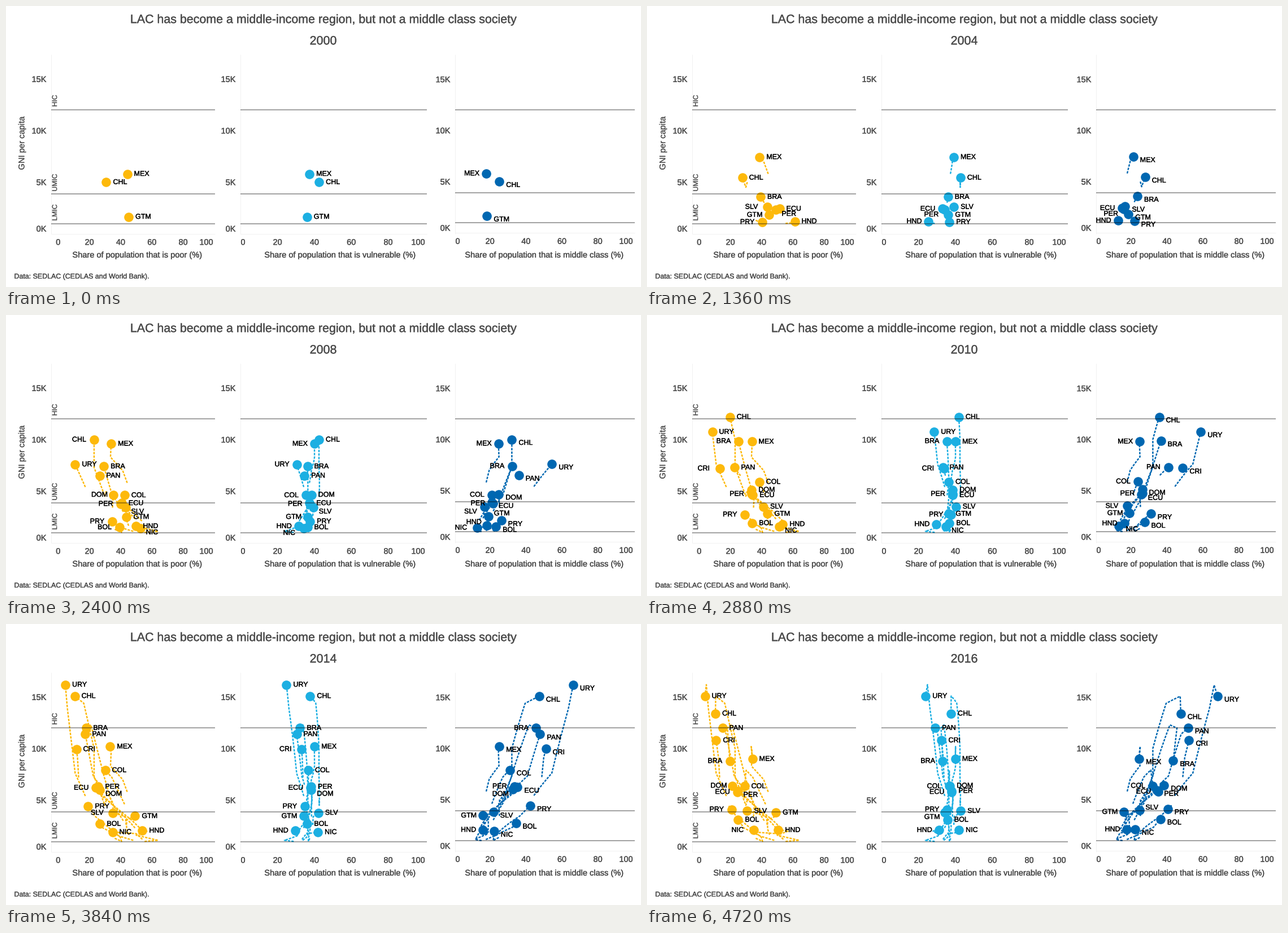
A matplotlib script for the animation above (4800 ms loop, 1124x498 px).

```python
import math

import matplotlib.pyplot as plt
import numpy as np
from matplotlib.animation import FuncAnimation
from matplotlib.patheffects import withStroke

W, H, DPI = 1124, 498, 100
FRAMES, INTERVAL = 60, 80
FIRST, LAST = 2000, 2016
PT = 72 / DPI
GREY = "#4c4c4c"
LABEL_W, LABEL_H, RADIUS = 27, 10, 8.3

plt.rcParams["font.family"] = "Liberation Sans"
plt.rcParams["text.hinting"] = "none"

fig = plt.figure(figsize=(W / DPI, H / DPI), dpi=DPI, facecolor="white")
ax = fig.add_axes([0, 0, 1, 1])
ax.set_xlim(-0.5, W - 0.5)  # whole numbers are pixel centres
ax.set_ylim(H - 0.5, -0.5)
ax.axis("off")


def write(x, y, s, size, color=GREY, ha="center", weight=0.25, **kw):
    """Text whose capitals are centred on y; sizes in pixels."""
    if "rotation" in kw:
        kw["va"] = "center"
    else:
        kw["va"] = "baseline"
        y += 0.36 * size
    effect = [withStroke(linewidth=weight, foreground=color)]
    return ax.text(x, y, s, fontsize=size * PT, color=color, ha=ha,
                   path_effects=effect, **kw)


def rule(xs, ys, color, width, **kw):
    ax.plot(xs, ys, color=color, lw=width * PT, solid_capstyle="butt", **kw)


class Panel:
    """One chart: maps a share in % and an income in thousands to pixels."""

    def __init__(self, left, right, zero, scale, caption_x, group, color,
                 label_drop=-1, shrink=1):
        self.left, self.right = left, right
        self.zero, self.scale = zero, scale
        self.caption_x, self.group, self.color = caption_x, group, color
        self.label_drop, self.shrink = label_drop, shrink

    def x(self, share):
        return self.zero + self.scale * share

    def row(self, y):
        return 183 + (y - 183) * self.shrink

    def y(self, income):
        return self.row(403 - 18.27 * income)

    def draw_frame(self):
        span = [self.left, self.right]
        rule([self.left] * 2, [85, 403], "#f1f1f1", 1, zorder=1)
        rule(span, [self.row(403)] * 2, "#f1f1f1", 1, zorder=1)
        for y in (183.5, 332, 385):
            rule(span, [self.row(y)] * 2, "black", 2, alpha=0.36, zorder=4)
        for k in (0, 5, 10, 15):
            y = min(self.y(k), self.row(394))
            write(self.left - 8, y, f"{k}K", 14.6, ha="right")
        for share in range(0, 101, 20):
            x = np.clip(self.x(share), self.left + 5, self.right - 15)
            write(x, self.row(417.5), str(share), 14.5)
        write(self.caption_x, 440,
              f"Share of population that is {self.group} (%)", 14.6)


PANELS = [
    Panel(79, 369, 91.8, 2.766, 232, "poor", "#fdb90b"),
    Panel(414, 744, 414.8, 3.265, 591, "vulnerable", "#1cafe2"),
    Panel(794, 1112, 792.5, 3.183, 952.5, "middle class", "#0067b1",
          label_drop=5, shrink=0.993),
]
for panel in PANELS:
    panel.draw_frame()

write(561, 22, "LAC has become a middle-income region, but not a middle class society", 21.4)
year_text = write(561, 60, "2000", 21.5)
write(14, 478, "Data: SEDLAC (CEDLAS and World Bank).", 12.4, ha="left")
write(28, 242.5, "GNI per capita", 14.7, weight=0.1, rotation=90)
for y, s in [(167.5, "HIC"), (312.5, "UMIC"), (365.5, "LMIC")]:
    write(86.5, y, s, 12.2, weight=0.1, rotation=90)


class Country:
    """Path through a few (year, income, poor) points.

    The middle class grows as poverty falls, scaled by `tilt`;
    the vulnerable are what is left after a small rich group.
    """

    def __init__(self, name, tilt, *points):
        years, income, poor = zip(*points)
        self.start = years[0]
        span = np.arange(self.start, LAST + 1)
        income = np.interp(span, years, income)
        poor = np.interp(span, years, poor)
        middle = tilt * 75 * np.exp(-poor / 32)
        rich = np.clip(0.13 * (middle - 14), 0.6, 4.3)
        shares = [poor, 100 - poor - middle - rich, middle]
        self.xs = [p.x(s) for p, s in zip(PANELS, shares)]
        self.ys = [p.y(income) for p in PANELS]
        self.trails, self.dots, self.labels = [], [], []
        for p in PANELS:
            self.trails += ax.plot([], [], color=p.color, lw=2.4 * PT, zorder=2,
                                   ls=(0, (1.75, 0.85)), dash_capstyle="butt")
            self.dots += ax.plot([], [], "o", color=p.color, ms=2 * RADIUS * PT,
                                 mew=0, zorder=3, snap=False)
            self.labels.append(write(0, 0, name, 12.5, "black", ha="left", zorder=5))

    def show(self, i, year):
        """Update panel i and return the mark's place, or None before the start."""
        n = year - self.start + 1
        trail, dot, label = self.trails[i], self.dots[i], self.labels[i]
        for artist in (trail, dot, label):
            artist.set_visible(n > 0)
        if n <= 0:
            return None
        xs, ys = self.xs[i][:n], self.ys[i][:n]
        trail.set_data(xs, ys)
        dot.set_data(xs[-1:], ys[-1:])
        return xs[-1], ys[-1]


COUNTRIES = []


def country(*args):
    COUNTRIES.append(Country(*args))


country("GTM", 1.0, (2000, 1.64, 45.1), (2003, 1.64, 45.1), (2006, 2.2, 43.8),
        (2012, 3.1, 43.8), (2014, 3.45, 49.2), (2016, 3.8, 49.1))
country("HND", 1.15, (2001, 1.0, 55.3), (2003, 1.1, 64), (2008, 1.6, 49.9),
        (2012, 2.0, 57.1), (2016, 2.1, 50.6))
country("PRY", 1.03, (2001, 1.3, 36.2), (2003, 1.0, 40.6), (2006, 1.4, 39.8),
        (2012, 3.4, 23.9), (2014, 4.4, 19.2), (2016, 4.1, 20.7))
country("BOL", 1.06, (2006, 1.1, 48.1), (2008, 1.5, 39.3), (2012, 2.3, 28.6),
        (2016, 3.1, 25))
country("NIC", 0.88, (2006, 1.2, 53.9), (2012, 1.75, 49.9), (2014, 1.9, 34.8),
        (2016, 2.1, 34.8))
country("SLV", 0.87, (2004, 2.6, 43.5), (2008, 3.4, 43.1), (2012, 3.6, 39.1),
        (2016, 3.95, 30.8))
country("ECU", 1.0, (2003, 2.1, 53.6), (2006, 3.05, 47.1), (2012, 5.4, 27.9),
        (2014, 6.2, 24.1), (2016, 5.8, 24.3))
country("PER", 1.0, (2004, 2.3, 49.2), (2006, 2.8, 46.3), (2012, 5.7, 27.2),
        (2014, 6.3, 25.7), (2016, 5.9, 24.7))
country("DOM", 1.0, (2006, 3.4, 34.8), (2008, 4.65, 35.3), (2012, 5.6, 31.9),
        (2016, 6.4, 21.4))
country("COL", 1.06, (2008, 4.6, 42.5), (2012, 7.2, 34.4), (2014, 7.9, 30.1),
        (2016, 6.35, 29))
country("CRI", 0.98, (2010, 7.2, 13.1), (2012, 9.1, 12.4), (2016, 10.8, 10.9))
country("PAN", 1.1, (2008, 6.5, 26.5), (2010, 7.3, 22.5), (2014, 11.4, 17.4),
        (2016, 12, 14.9))
country("BRA", 1.07, (2003, 3.0, 41.7), (2006, 4.7, 34.4), (2008, 7.4, 29.2),
        (2012, 12.3, 21), (2014, 12, 18.1), (2016, 8.8, 19.6))
country("URY", 1.02, (2006, 5.4, 17.4), (2008, 7.6, 10.9), (2012, 13.9, 5.9),
        (2014, 16.2, 4.6), (2016, 15.1, 3.7))
country("CHL", 0.88, (2000, 5.0, 30.8), (2003, 4.5, 29.9), (2006, 7.3, 23),
        (2008, 10, 23), (2012, 14.4, 16.4), (2014, 15.1, 10.6), (2016, 13.4, 10.4))
country("MEX", 0.95, (2000, 5.8, 44.2), (2003, 7.0, 41.3), (2006, 8.3, 33.5),
        (2008, 9.6, 33.9), (2014, 10.2, 33.3), (2016, 9.0, 34.1))


def overlap(x, y, w, h, boxes):
    """Total area shared by a box (centre and size) and a list of boxes."""
    if not boxes:
        return 0
    bx, by, bw, bh = np.array(boxes).T
    dx = (w + bw) / 2 - abs(x - bx)
    dy = (h + bh) / 2 - abs(y - by)
    return float(np.sum(np.maximum(dx, 0) * np.maximum(dy, 0)))


def place_labels(marks, panel):
    """Put each label right of its mark, or on the side that is least crowded."""
    side = 12 + LABEL_W / 2
    spots = [(side, panel.label_drop), (-side, -1), (side - 2, -6), (side - 2, 6),
             (-side + 3, -7), (-side + 3, 7), (8, -12), (8, 13)]
    labels = []
    for c, (x, y), label in sorted(marks, key=lambda m: m[1][1]):
        dots = [(*xy, 2 * RADIUS, 2 * RADIUS) for other, xy, _ in marks if other is not c]

        def cost(k):
            box = x + spots[k][0], y + spots[k][1], LABEL_W, LABEL_H
            return overlap(*box, labels) + 0.6 * overlap(*box, dots) + 8 * k

        dx, dy = spots[min(range(len(spots)), key=cost)]
        labels.append((x + dx, y + dy, LABEL_W, LABEL_H))
        label.set_position((x + dx - LABEL_W / 2, y + dy + 0.36 * 12.5))


def update(frame):
    step = math.floor((frame - 2.5) / 3.1)
    year = FIRST + min(max(step, 0), LAST - FIRST)
    year_text.set_text(str(year))
    for i, panel in enumerate(PANELS):
        shown = [(c, c.show(i, year), c.labels[i]) for c in COUNTRIES]
        place_labels([m for m in shown if m[1]], panel)
    return []


anim = FuncAnimation(fig, update, frames=FRAMES, interval=INTERVAL,
                     init_func=lambda: update(0), repeat=True, blit=False)
plt.show()
```
